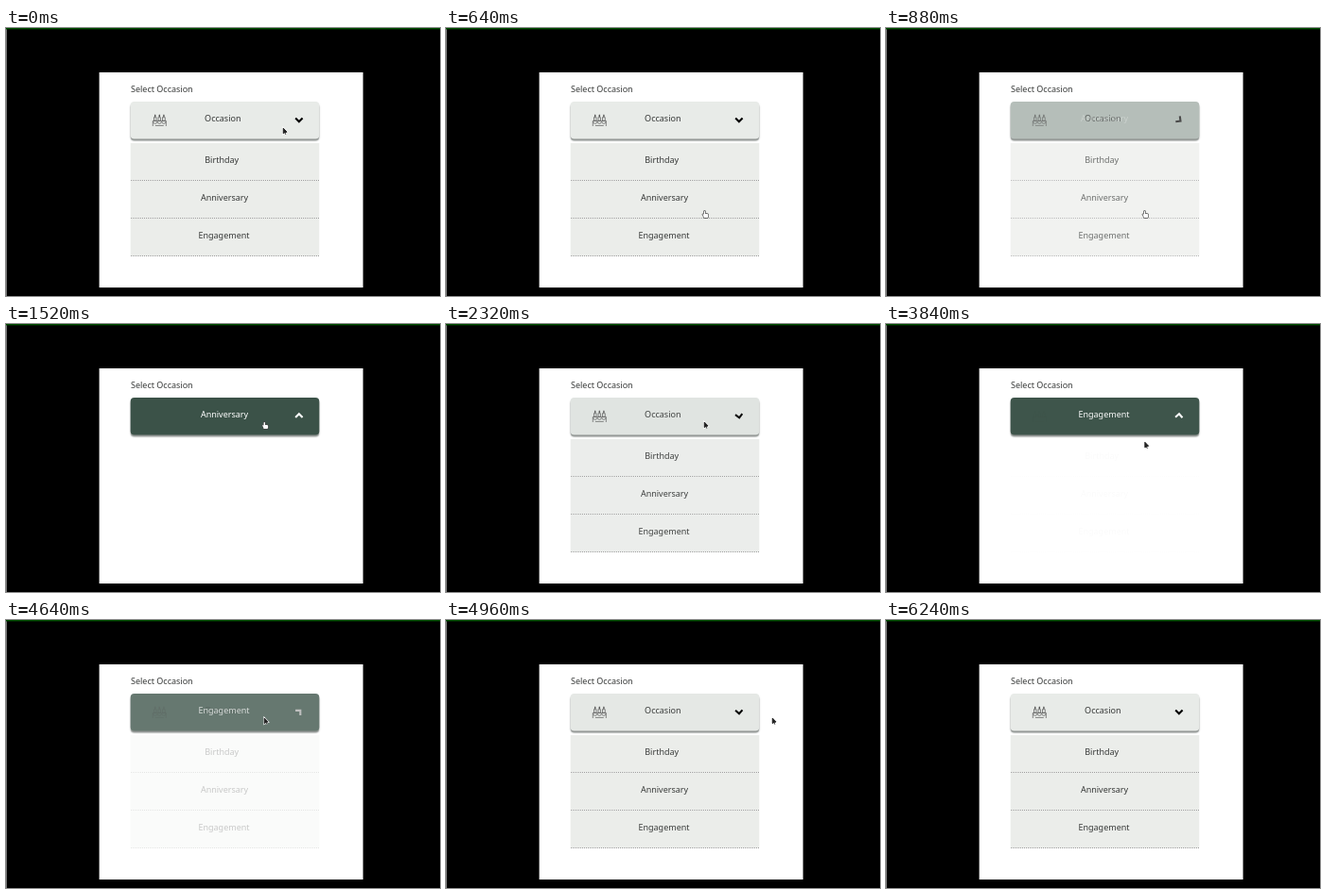
An HTML page with a canvas that plays this animation: 459x284 px, repeating every 6.64 s.

```html
<!DOCTYPE html>
<html lang="en">
<head>
<meta charset="utf-8">
<title>Occasion dropdown</title>
<style>
html, body { margin: 0; width: 100%; height: 100%; overflow: hidden; background: #000; }
canvas { display: block; width: 459px; height: 284px; }
</style>
</head>
<body>
<canvas id="stage" width="459" height="284"></canvas>
<script>
const ctx = document.getElementById('stage').getContext('2d');
const LOOP = 6640, STEP = 80, FADE = 500;
const LIGHT = [232, 235, 232], DARK = [59, 82, 72];
const INK = '#363837';
const BOX = { x: 131.7, y: 78, w: 199.6, h: 39.4 };
const ROW = 40, LIST_TOP = 122;

const ITEMS = [
  { label: 'Birthday', x: 228.2 },
  { label: 'Anniversary', x: 231 },
  { label: 'Engagement', x: 230.5 }
];

// Each choice closes the menu, a later click opens it again.
const CHOICES = [
  { close: 780, open: 1955, item: ITEMS[1] },
  { close: 3428, open: 4550, item: ITEMS[2] }
];

const START = { x: 293.3, y: 106.2 };
const ON_HEADER = { x: 273.3, y: 104 };
const MOVES = [
  { from: 0, to: 640, spot: { x: 273.5, y: 194 } },
  { from: 1000, to: 1440, spot: ON_HEADER },
  { from: 2480, to: 3200, spot: { x: 276.3, y: 220.5 } },
  { from: 3520, to: 3960, spot: ON_HEADER },
  { from: 4640, to: 5200, spot: { x: 392, y: 104 } }
];

const lerp = (a, b, k) => a + (b - a) * k;
const clamp = v => Math.min(1, Math.max(0, v));
const smooth = u => u * u * (3 - 2 * u);
const mix = (a, b, k) => `rgb(${a.map((v, i) => Math.round(lerp(v, b[i], k)))})`;

// The CSS "ease" curve: cubic-bezier(.25, .1, .25, 1)
function ease(x) {
  if (x <= 0 || x >= 1) return clamp(x);
  const curve = (u, a, b) => 3 * u * (1 - u) ** 2 * a + 3 * u * u * (1 - u) * b + u ** 3;
  let lo = 0, hi = 1;
  for (let i = 0; i < 20; i++) {
    const mid = (lo + hi) / 2;
    if (curve(mid, .25, .25) < x) lo = mid; else hi = mid;
  }
  return curve(lo, .1, 1);
}

function menuAt(t) {
  const { close, open, item } = CHOICES.findLast(c => c.close <= t) || CHOICES[0];
  return {
    item,
    closed: ease((t - close) / FADE) - ease((t - open) / FADE),
    clickable: t >= close && t < open
  };
}

function pointerAt(t) {
  return MOVES.reduce((p, { from, to, spot }) => {
    const k = smooth(clamp((t - from) / (to - from)));
    return { x: lerp(p.x, spot.x, k), y: lerp(p.y, spot.y, k) };
  }, START);
}

function faded(alpha, draw) {
  if (alpha <= 0) return;
  ctx.save();
  ctx.globalAlpha = alpha;
  draw();
  ctx.restore();
}

function text(label, x, y, color = INK, align = 'center') {
  ctx.font = '9px "Noto Sans", "Open Sans", sans-serif';
  ctx.textAlign = align;
  ctx.fillStyle = color;
  ctx.fillText(label, x, y);
}

function line(...points) {
  ctx.beginPath();
  points.forEach(([x, y]) => ctx.lineTo(x, y));
  ctx.stroke();
}

function cake() {
  ctx.save();
  ctx.translate(162.3, 91);
  ctx.strokeStyle = ctx.fillStyle = '#555';
  ctx.lineWidth = .7;
  for (let i = -1; i <= 1; i++) {
    const x = i * 4.6;
    ctx.beginPath();
    ctx.ellipse(x, 2, .8, 1.6, 0, 0, 7);
    ctx.fill();
    ctx.strokeRect(x - 1.3, 3.8, 2.6, 3.4);
    ctx.beginPath();
    ctx.arc(x, 8.2, 2.1, 0, Math.PI);
    ctx.stroke();
  }
  line([-7, 13], [-7, 7.4], [7, 7.4], [7, 13]);
  line([-4.5, 12.4], [4.5, 12.4]);
  ctx.restore();
}

function chevron(closed) {
  ctx.save();
  ctx.translate(309.9, 97.3);
  ctx.rotate(-Math.PI * closed);
  ctx.strokeStyle = mix([0, 0, 0], [255, 255, 255], closed);
  ctx.lineWidth = 2.1;
  line([-3.7, -1.7], [0, 2], [3.7, -1.7]);
  ctx.restore();
}

function header({ closed, item }) {
  ctx.save();
  ctx.shadowColor = 'rgba(60,68,64,.6)';
  ctx.shadowOffsetY = 2;
  ctx.shadowBlur = 1.4;
  ctx.fillStyle = mix(LIGHT, DARK, closed);
  ctx.beginPath();
  ctx.roundRect(BOX.x, BOX.y, BOX.w, BOX.h, 4);
  ctx.fill();
  ctx.restore();

  faded(1 - closed, () => {
    cake();
    text('Occasion', 229.3, 99.4);
  });
  faded(closed, () => text(item.label, item.x, 99.4, '#fff'));
  chevron(closed);
}

function list() {
  ITEMS.forEach(({ label, x }, i) => {
    const top = LIST_TOP + i * ROW, bottom = LIST_TOP + ROW * (i + 1) - .5;
    ctx.fillStyle = '#ebedea';
    ctx.fillRect(BOX.x, top, BOX.w, bottom - top);
    ctx.strokeStyle = '#999';
    ctx.lineWidth = 1;
    ctx.setLineDash([1, 1]);
    line([132, bottom], [331, bottom]);
    ctx.setLineDash([]);
    text(label, x, top + 21.4);
  });
}

function arrow() {
  ctx.beginPath();
  ctx.moveTo(0, 0);
  ctx.lineTo(0, 5.6);
  ctx.lineTo(1.5, 4.4);
  ctx.lineTo(3.8, 4);
  ctx.closePath();
  ctx.moveTo(1.3, 4);
  ctx.lineTo(2.5, 6.6);
  ctx.strokeStyle = '#fff';
  ctx.lineWidth = 1.8;
  ctx.stroke();
  ctx.fillStyle = ctx.strokeStyle = '#222';
  ctx.lineWidth = 1;
  ctx.fill();
  ctx.stroke();
}

function hand() {
  const shape = grow => {
    ctx.beginPath();
    ctx.roundRect(-.7 - grow, -grow, 1.4 + 2 * grow, 5 + 2 * grow, .7 + grow);
    ctx.roundRect(-1.2 - grow, 3 - grow, 5 + 2 * grow, 4 + 2 * grow, 1.2 + grow);
    ctx.ellipse(-1.3, 4, 1 + grow, .7 + grow, .6, 0, 7);
    ctx.fill();
  };
  ctx.fillStyle = '#444';
  shape(.65);
  ctx.fillStyle = '#fff';
  shape(0);
}

function pointer({ x, y }, { closed, clickable }) {
  const overList = y > BOX.y + BOX.h;
  ctx.save();
  ctx.translate(x, y);
  if (overList ? closed < .98 : clickable) hand(); else arrow();
  ctx.restore();
}

function render(t) {
  const menu = menuAt(t);
  ctx.fillStyle = '#000';
  ctx.fillRect(0, 0, 459, 284);
  ctx.fillStyle = '#777';
  ctx.fillRect(0, 0, 1, 284);
  ctx.fillStyle = '#004d00';
  ctx.fillRect(0, 0, 459, 1.4);

  ctx.save();
  ctx.beginPath();
  ctx.rect(98.6, 47, 279, 228);
  ctx.clip();
  ctx.fillStyle = '#fff';
  ctx.fillRect(98, 46, 281, 230);
  text('Select Occasion', 132, 68.4, INK, 'left');
  faded(1 - menu.closed, list);
  header(menu);
  pointer(pointerAt(t), menu);
  ctx.restore();
}

const start = performance.now();
function tick() {
  const t = (performance.now() - start) % LOOP;
  render(Math.floor(t / STEP) * STEP);
  requestAnimationFrame(tick);
}
tick();
</script>
</body>
</html>
```
